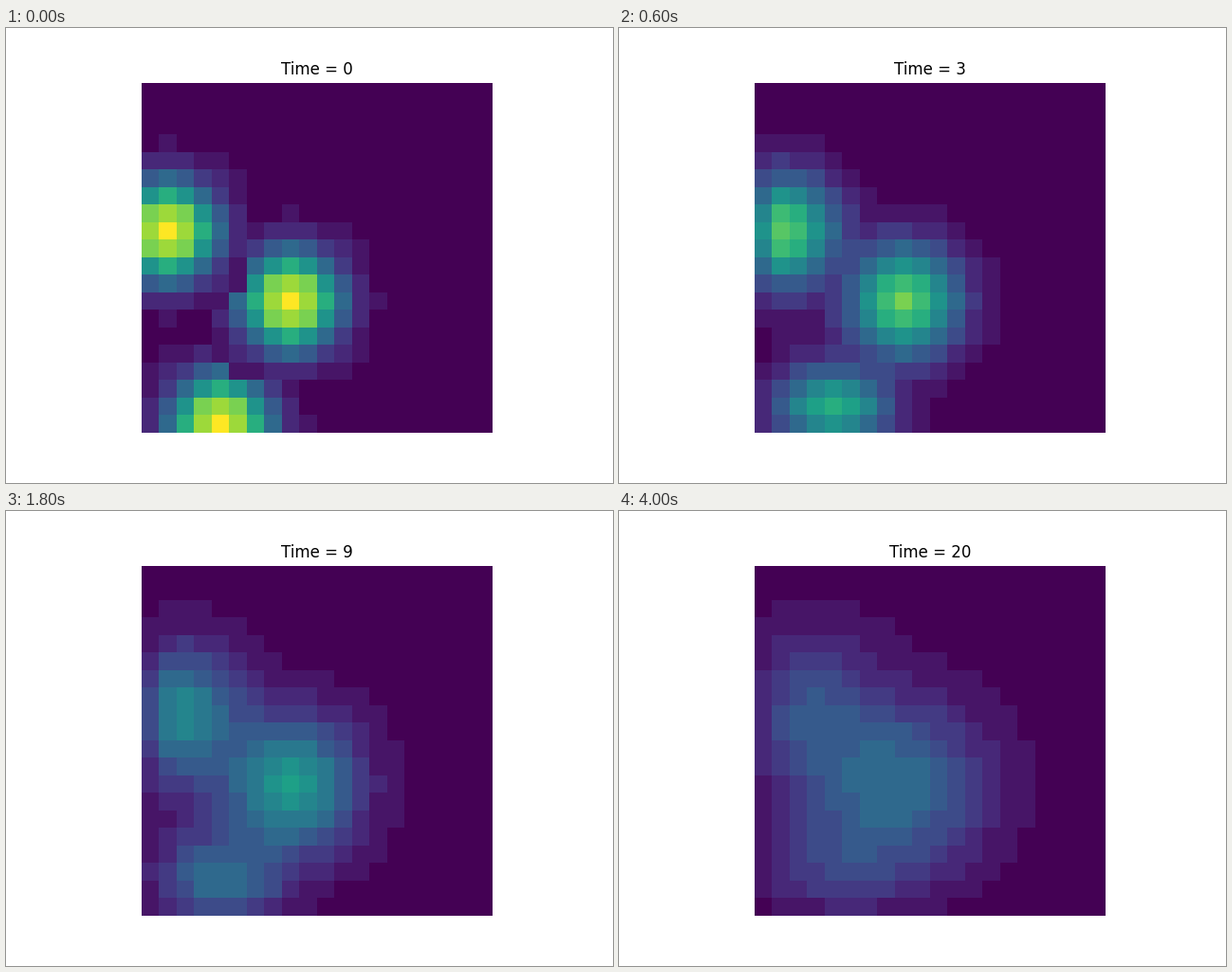
Recreate the animation shown at these times as a matplotlib script. Size 640 px wide and 480 px high, loop 4.2 s.

```python
import numpy as np
import matplotlib.pyplot as plt
from matplotlib.animation import FuncAnimation

SIZE = 20
STEPS = 21
RADIUS = 5
SIGMA = 2.0
RATE = 0.5   # share of each cell handed to its eight neighbours per step
BAND = 0.057  # height of one flat colour band
CENTERS = [(19, 4), (12, 8), (8, 1)]  # (row, column), later ones overwrite


def initial_field():
    rows, cols = np.indices((SIZE, SIZE))
    field = np.zeros((SIZE, SIZE))
    for row, col in CENTERS:
        dist2 = (rows - row) ** 2 + (cols - col) ** 2
        disc = dist2 <= RADIUS ** 2
        field[disc] = np.exp(-dist2[disc] / (2 * SIGMA ** 2))
    return field


def diffuse(field):
    """Spread to the neighbours; whatever crosses the border is lost."""
    padded = np.pad(field, 1)
    block = sum(padded[r:r + SIZE, c:c + SIZE]
                for r in range(3) for c in range(3))
    return (1 - RATE) * field + RATE / 8 * (block - field)


def banded(field):
    return BAND * np.rint(field / BAND)


fields = [initial_field()]
while len(fields) < STEPS:
    fields.append(diffuse(fields[-1]))

fig, ax = plt.subplots(figsize=(6.4, 4.8), dpi=100)
image = ax.imshow(banded(fields[0]), cmap="viridis", vmin=0, vmax=1,
                  interpolation="nearest")
title = ax.set_title("Time = 0")
ax.axis("off")


def update(step):
    image.set_data(banded(fields[step]))
    title.set_text(f"Time = {step}")
    return image, title


anim = FuncAnimation(fig, update, frames=STEPS, interval=200,
                     repeat=True, repeat_delay=0, blit=False)
plt.show()
```
